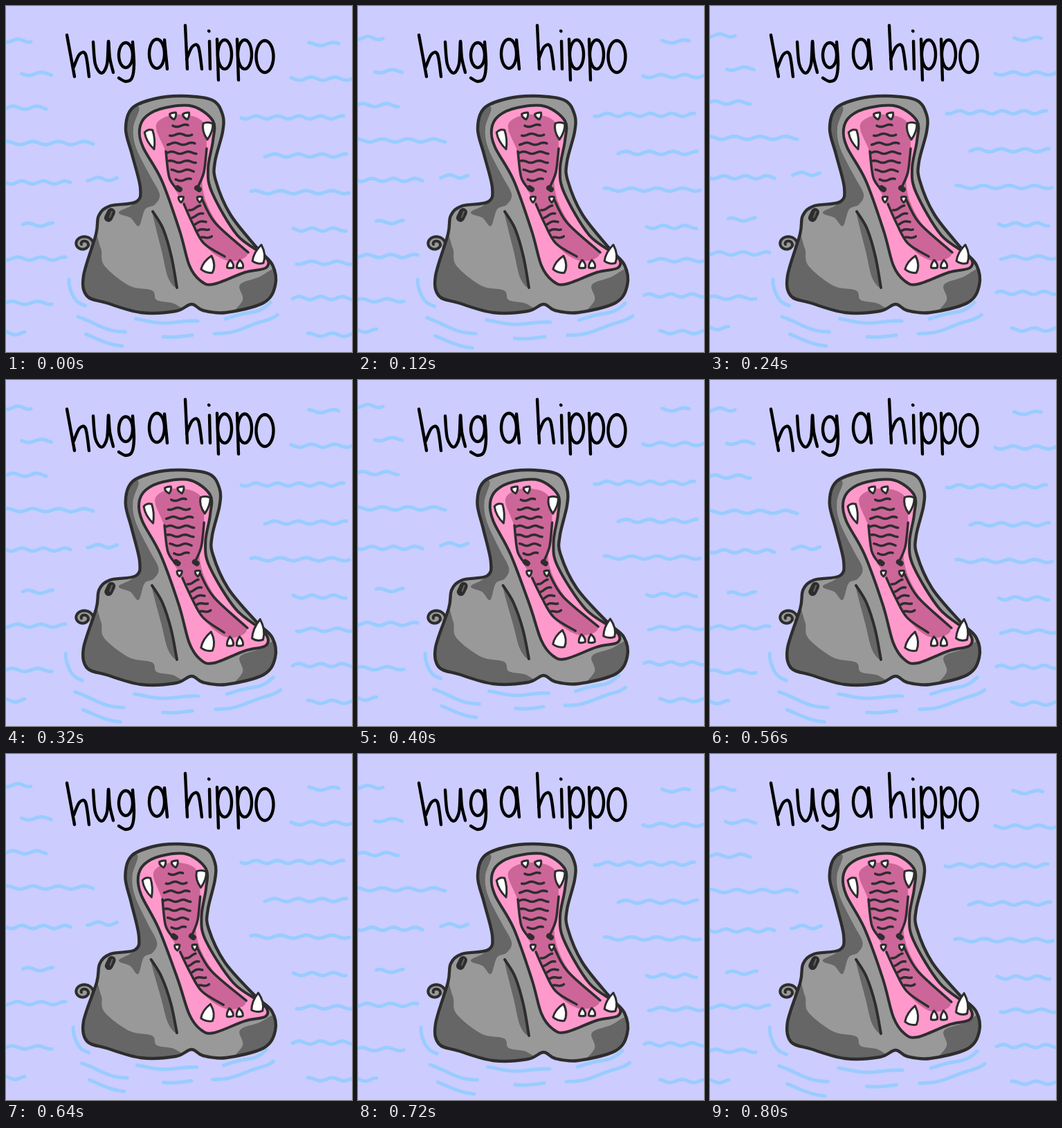
Write an HTML page with a canvas that moves like this. It is 500 by 500 pixels and loops after 0.84 s.

```html
<!DOCTYPE html>
<html lang="en">
<head>
<meta charset="utf-8">
<title>hug a hippo</title>
<style>
  html, body { margin: 0; width: 100%; height: 100%; overflow: hidden; background: #ccccff; }
  canvas { display: block; width: 500px; height: 500px; }
</style>
</head>
<body>
<canvas id="stage" width="500" height="500" role="img" aria-label="hug a hippo"></canvas>
<script>
const ctx = document.getElementById('stage').getContext('2d');
const STEP = 40, STEPS = 21, TAU = 2 * Math.PI;
const SKY = '#ccccff', WATER = '#99ccff', INK = '#2d2d2d', DARK = '#666666', LIGHT = '#999999';
const PINK = '#ff99cc', FLESH = '#cc6699';

// The head narrows, the body lifts, the lower jaw drops and the front teeth turn.
const poses = [
  { squeeze: 0, lift: 0, drop: 0, turn: 0 },
  { squeeze: 0.075, lift: 4, drop: 1, turn: -10 },
  { squeeze: 0.03, lift: 3, drop: 7, turn: -5 }
];

const clamp = t => Math.max(0, Math.min(1, t));
const same = (x, y) => [x, y];
const narrow = (pose, x, y) => x - pose.squeeze * (x - 165) * clamp((380 - y) / 120);
const bodyWarp = pose => (x, y) => [narrow(pose, x, y), y - pose.lift * clamp((y - 330) / 70)];
const mouthWarp = pose => (x, y) => [narrow(pose, x, y), y + pose.drop * clamp((y - 340) / 50)];

// Smooth path through "x,y x,y ..." points.
function curve(text, closed = false, warp = same) {
  const p = text.trim().split(/\s+/).map(s => warp(...s.split(',').map(Number)));
  const n = p.length, path = new Path2D();
  const at = i => closed ? p[(i + n) % n] : p[clamp(i / (n - 1)) * (n - 1) + 0.5 | 0];
  path.moveTo(...p[0]);
  for (let i = 0; i < (closed ? n : n - 1); i++) {
    const [a, b, c, d] = [at(i - 1), at(i), at(i + 1), at(i + 2)];
    path.bezierCurveTo(b[0] + (c[0] - a[0]) / 6, b[1] + (c[1] - a[1]) / 6,
      c[0] - (d[0] - b[0]) / 6, c[1] - (d[1] - b[1]) / 6, c[0], c[1]);
  }
  if (closed) path.closePath();
  return path;
}

// Path through the points that a function gives for t from 0 to 1.
function trace(point, count = 40) {
  const path = new Path2D();
  for (let i = 0; i <= count; i++) path.lineTo(...point(i / count));
  return path;
}

function line(path, width, color = INK) {
  ctx.lineWidth = width;
  ctx.strokeStyle = color;
  ctx.stroke(path);
}

function fill(path, color) {
  ctx.fillStyle = color;
  ctx.fill(path);
}

function inside(path, paint) {
  ctx.save();
  ctx.clip(path);
  paint();
  ctx.restore();
}

// Lettering
const ink = path => line(path, 4.4, '#000');
const stem = (x0, y0, x1, y1) => ink(curve(`${x0},${y0} ${x1},${y1}`));
const bowl = (x, y, rx, ry) =>
  ink(trace(t => [x + rx * Math.cos(t * TAU), y + ry * Math.sin(t * TAU)]));

function letterH(x, top, lean, base) {
  const foot = x + lean;
  stem(x, top, foot, base);
  ink(curve(`${foot - 1},${base - 14} ${foot + 7},${base - 32} ${foot + 16},${base - 32} ${foot + 21},${base}`));
}

function letterP(x) {
  stem(x, 48, x + 2, 107);
  bowl(x + 11, 70, 10, 21);
}

function drawLettering() {
  letterH(88, 42, 11, 102);
  ink(curve('126,52 129,84 138,97 146,84 148,51 150,75 155,96'));
  bowl(173, 71, 10, 18);
  ink(curve('183,52 185,84 182,104 173,109 163,104'));
  bowl(218, 69, 11, 21);
  stem(229, 49, 233, 91);
  letterH(259, 28, 3, 91);
  stem(294, 51, 295, 91);
  stem(293, 36, 293.5, 36.5);
  letterP(305);
  letterP(334);
  bowl(374, 73, 12.5, 23);
}

// Water: [end or start or middle, y] of each wave
const leftWaves = [[36, 50], [58, 147], [126, 198], [93, 255], [86, 365], [66, 429], [27, 473]];
const rightWaves = [[412, 105], [420, 371], [414, 422], [436, 475]];
const shortWaves = [[44, 98], [139, 250], [46, 316], [459, 55]];
const longWaves = [[414, 161, 148], [433, 216, 118], [425, 269, 142], [453, 323, 76]];
const waves = [
  ...leftWaves.map(([x, y]) => [-6, x, y]),
  ...rightWaves.map(([x, y]) => [x, 506, y]),
  ...[...shortWaves, ...longWaves].map(([x, y, w = 43]) => [x - w / 2, x + w / 2, y])
];

function drawWaves(step) {
  const shift = -1.25 * Math.min(step, 20 - step);
  const alternate = Math.floor(step / 2) % 2;
  waves.forEach(([x0, x1, y], i) => {
    const inset = x0 > 0 && x1 < 500 ? alternate * 2 : 0;
    const length = x1 - x0 - 2 * inset;
    const turns = length / (31 + i % 3 * 3);
    line(trace(t => [x0 + inset + length * t,
      y + shift + 2.2 * Math.sin(t * turns * TAU + i * 1.7 + alternate * 0.6)], 60), 5, WATER);
  });
}

// Broken rings round the body: [ring, from, to] in degrees
const arcs = [[0, 180, 148], [0, 112, 78], [0, 62, 27], [1, 145, 115], [1, 96, 82], [1, 71, 31], [2, 133, 114]];

function drawRings(step) {
  const scale = [1, 1.03, 0.96][Math.floor(step / 2) % 3];
  for (const [ring, from, to] of arcs) {
    const rx = (154 + 18 * ring) * scale, ry = (62 + 20 * ring) * scale;
    line(trace(t => {
      const a = (from + (to - from) * t) * TAU / 360;
      const ripple = 1.5 * Math.sin(a * 12 + ring);
      return [245 + rx * Math.cos(a), 395 + ry * Math.max(0, Math.sin(a)) ** 0.75 + ripple];
    }), 5, WATER);
  }
}

// Hippo
const bodyShape = `130,330 134,303 150,289 188,283 194,262 182,214 173,178 182,148 215,134 255,130
  298,136 313,157 313,182 302,225 303,252 324,301 363,350 385,374 389,404 372,429 318,443
  285,440 268,431 245,441 195,443 145,429 117,419 112,390`;
const mouthShape = `193,178 198,204 225,252 251,325 265,375 281,397 300,402 345,385 376,378 374,361
  334,331 298,270 292,235 299,195 299,166 270,145 230,147 203,159`;
const palateShape = `217,172 245,157 283,166 290,205 284,262 305,313 349,356 320,368 284,342 257,287 237,250 231,212`;
const shadows = [
  '165,150 192,146 184,176 188,205 208,245 222,272 215,287 201,294 192,318 180,306 163,298 188,280 180,230',
  '122,325 137,350 142,375 178,404 211,411 218,425 245,431 255,450 150,460 95,420',
  '212,298 230,328 243,375 246,406 234,392 225,354',
  '338,403 365,392 395,380 398,430 325,452 342,425'
];
const folds = [
  '231,210 236,248 248,266', '290,206 286,240 278,260', '257,286 270,315 286,343 316,362',
  '282,276 302,313 350,356'
];

// Pointed tooth from the middle of its root to its tip.
function tooth(warp, rootX, rootY, tipX, tipY, width) {
  const [x0, y0] = warp(rootX, rootY), [x1, y1] = warp(tipX, tipY);
  const size = Math.hypot(x1 - x0, y1 - y0);
  const nx = (y0 - y1) / size * width / 2, ny = (x1 - x0) / size * width / 2;
  const path = new Path2D();
  path.moveTo(x1, y1);
  path.quadraticCurveTo((x0 + x1) / 2 + nx * 1.3, (y0 + y1) / 2 + ny * 1.3, x0 + nx, y0 + ny);
  path.quadraticCurveTo(x0 - (x1 - x0) * 0.15, y0 - (y1 - y0) * 0.15, x0 - nx, y0 - ny);
  path.quadraticCurveTo((x0 + x1) / 2 - nx * 1.1, (y0 + y1) / 2 - ny * 1.1, x1, y1);
  path.closePath();
  fill(path, '#fff');
  line(path, 3);
}

function drawRidges(warp) {
  for (let i = 0; i < 12; i++) {
    const upper = i < 7;
    const y = upper ? 173 + 13 * i : 292 + 10.5 * (i - 7);
    const x = 252 + (y - 173) * 0.05 + Math.max(0, y - 250) * 0.35;
    const width = upper ? 22 + 20 * Math.sin(i / 6 * Math.PI) : 16;
    line(trace(t => warp(x + (t - 0.5) * width,
      y + 1.6 * Math.sin(t * TAU * width / 24 + i) - (upper ? 0 : 4 * (t - 0.5))), 16), 3.5);
  }
}

function drawTeeth(warp, turn) {
  tooth(warp, 206, 181, 214, 207, 12);
  tooth(warp, 292, 170, 291, 193, 14);
  tooth(warp, 290, 383, 297, 361, 17);
  tooth(warp, 364, 370, 369, 345, 16);
  for (const x of [241, 260]) tooth(warp, x + turn, 155, x + turn + 2, 164, 9);
  for (const x of [324, 338]) tooth(warp, x, 378, x, 367, 9);
  for (const x of [253, 280]) tooth(warp, x, 276, x, 284, 7);
  for (const x of [248, 276]) line(trace(t => warp(x + 3 * t, 263 + 2 * t), 1), 8);
}

function drawHippo(pose) {
  const skin = bodyWarp(pose), gum = mouthWarp(pose);
  const body = curve(bodyShape, true, skin), mouth = curve(mouthShape, true, gum);
  const tail = trace(t => {
    const a = 0.5 - t * 1.6 * TAU, r = 15 - 12 * t;
    return [112 + r * Math.cos(a), 344 + r * 0.85 * Math.sin(a)];
  });
  fill(tail, LIGHT);
  line(tail, 4);
  inside(body, () => {
    fill(body, LIGHT);
    shadows.forEach(s => fill(curve(s, true, skin), DARK));
  });
  inside(mouth, () => {
    fill(mouth, PINK);
    fill(curve(palateShape, true, gum), FLESH);
  });
  line(mouth, 4);
  line(body, 4.4);
  folds.forEach(f => line(curve(f, false, gum), 3.5));
  line(curve('212,297 227,322 239,362 247,407', false, skin), 4);
  line(curve('152,298 148,306', false, skin), 12);
  line(curve('153,297 150,305', false, skin), 2, DARK);
  drawRidges(gum);
  drawTeeth(gum, pose.turn);
}

function draw(step) {
  ctx.fillStyle = SKY;
  ctx.fillRect(0, 0, 500, 500);
  ctx.lineCap = ctx.lineJoin = 'round';
  drawWaves(step);
  drawRings(step);
  drawHippo(poses[step % 3]);
  drawLettering();
}

const origin = performance.now();
function tick() {
  draw(Math.floor((performance.now() - origin) / STEP) % STEPS);
  requestAnimationFrame(tick);
}
tick();
</script>
</body>
</html>
```
